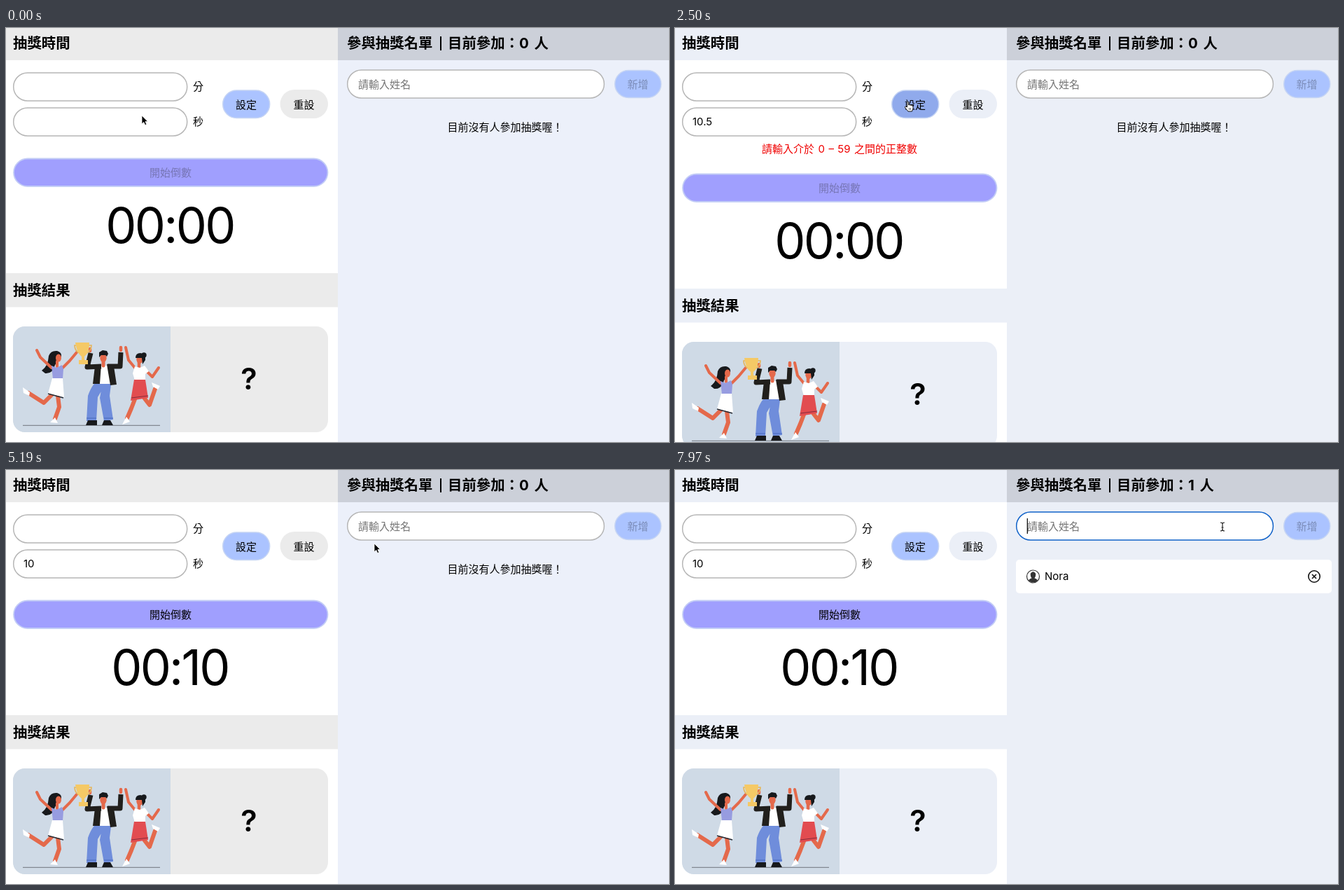
An HTML page for the animation above (8 s loop, 947 px wide and 591 px high).

```html
<!DOCTYPE html>
<html lang="zh-Hant">
<head>
<meta charset="utf-8">
<title>抽獎</title>
<style>
html, body { margin: 0; width: 100%; height: 100%; overflow: hidden; background: #fff; }
svg { display: block; width: 947px; height: 591px; }
text { font: 15px Inter, "Noto Sans CJK TC", "Noto Sans CJK", sans-serif; white-space: pre; }
.head { font-size: 20.4px; font-weight: 700; word-spacing: 3px; }
.mid { text-anchor: middle; }
#error { word-spacing: 1.2px; }
.clock { font-size: 70px; letter-spacing: -2.7px; font-feature-settings: "calt" 0; }
.mark { font-size: 43px; font-weight: 600; }
.box { fill: #fff; stroke: #b6b6b6; stroke-width: 1.5; }
.btn { fill: #abc3ff; stroke: #c6d5f4; stroke-width: 1.5; }
.limb { fill: none; stroke: #e4694b; stroke-linecap: round; stroke-linejoin: round; }
</style>
</head>
<body>
<svg viewBox="0 0 947 591">
  <defs>
    <clipPath id="card"><rect x="10" y="426" width="450" height="151" rx="17"/></clipPath>
  </defs>

  <rect class="panel" width="474" height="46"/>
  <text class="head" x="10" y="29">抽獎時間</text>
  <rect class="box" x="10.7" y="64" width="248" height="40" rx="20"/>
  <rect class="box" id="secBox" x="10.7" y="114" width="248" height="40" rx="20"/>
  <text x="267" y="89">分</text>
  <text x="267" y="139">秒</text>
  <text id="sec" x="25" y="139"></text>
  <g id="spin">
    <rect x="232" y="123" width="12" height="22" rx="1" fill="#eeeef1"/>
    <path d="M235 131l3-4 3 4zM235 137l3 4 3-4z" fill="#444"/>
  </g>
  <rect id="secCaret" y="123" width="1.2" height="21"/>
  <rect class="btn" id="set" x="309.7" y="89" width="67" height="39.5" rx="19.7"/>
  <text class="mid" x="343" y="114.5">設定</text>
  <rect class="panel" x="391.5" y="88" width="68.5" height="41" rx="20.5"/>
  <text class="mid" x="425.5" y="114.5">重設</text>
  <text class="mid" id="error" x="235" y="178" fill="#f00000">請輸入介於 0 – 59 之間的正整數</text>

  <g id="lower">
    <rect id="start" x="11" y="186.5" width="448.5" height="39.5" rx="19.7" stroke="#c3cdf6" stroke-width="1.8"/>
    <text class="mid" id="startText" x="235" y="211.5">開始倒數</text>
    <text class="mid clock" id="clock" x="234" y="306.5"></text>
    <rect class="panel" y="350" width="474.5" height="48.5"/>
    <text class="head" x="10" y="381.5">抽獎結果</text>
    <g clip-path="url(#card)">
      <rect class="panel" x="10" y="426" width="450" height="151"/>
      <rect x="10" y="426" width="225" height="151" fill="#cfdae6"/>
      <path d="M24 567.3H220" stroke="#70757c"/>

      <g id="leftWoman">
        <path d="M61 468q3-8 12-7 7 2 6 8l-9 12q-3 13-14 12l-5-4q9-6 10-21z" fill="#17191c"/>
        <path class="limb" d="M65 485L49 470 44 460M80 486L91 475 101 463" stroke-width="4"/>
        <path class="limb" d="M66 523L54 535 32 521" stroke-width="6"/>
        <path class="limb" d="M74 525L76 541 70 558" stroke-width="6"/>
        <path class="limb" d="M73 476V483" stroke-width="4"/>
        <ellipse cx="75" cy="471" rx="4" ry="5.5" fill="#e4694b"/>
        <path d="M65 482L72 485 80 481 82 487 81 501H67z" fill="#979ce0"/>
        <path d="M66 500H81L83 527 60 522z" fill="#fff"/>
        <path d="M60 522L82 528" stroke="#252932" stroke-width="1.5"/>
        <path d="M24 513L34 520 33 525 25 521zM70 556L74 564 63 563z" fill="#fff"/>
      </g>

      <g id="man">
        <path d="M133 501H144L143 507 131 527 129 561H115L117 525Q123 508 133 501zM139 501H151L148 525 153 559 140 561 134 528z" fill="#6f8ddb"/>
        <path d="M115 557H129M140 557H153" stroke="#496bbf" stroke-width="1.2"/>
        <path d="M117 560H130V567H114zM140 560H149L153 567H137z" fill="#17191c"/>
        <path d="M134 482H147L151 508H132z" fill="#fff"/>
        <path d="M136 483L116 484 121 464M145 483L163 483 164 463" fill="none" stroke="#211f1c" stroke-width="7" stroke-linejoin="round"/>
        <path d="M136 480L127 483 124 508H134zM144 480L154 483 158 509 149 510z" fill="#211f1c"/>
        <path class="limb" d="M120 461V458M164 460V456" stroke-width="4.5"/>
        <path class="limb" d="M139 475V482" stroke-width="5"/>
        <ellipse cx="139" cy="471" rx="4.7" ry="6" fill="#e4694b"/>
        <path d="M133 470V463L138 460 144 461 146 465 144 469 142 467H136z" fill="#17191c"/>
      </g>

      <g id="trophy">
        <path d="M101 453h-3q0 8 7 11M118 453h4q0 8-7 11" fill="none" stroke="#e6b65a" stroke-width="1.6"/>
        <path d="M99 449H119Q119 464 112 469V474H117V480H104V474H108V469Q101 464 99 449z" fill="#f5c966"/>
      </g>

      <g id="rightWoman">
        <circle cx="197" cy="467" r="3.7" fill="#17191c"/>
        <path class="limb" d="M184 485L175 474 171 456M200 489L209 498 218 485" stroke-width="4"/>
        <path class="limb" d="M198 529L205 538 213 515" stroke-width="6"/>
        <path class="limb" d="M184 530L179 543 173 557" stroke-width="6"/>
        <path class="limb" d="M190 476V484" stroke-width="4.5"/>
        <ellipse cx="191" cy="473" rx="4.7" ry="6" fill="#e4694b"/>
        <path d="M185 471q0-7 7-7 8 1 7 10l-4 6-1-9z" fill="#17191c"/>
        <path d="M184 483L191 485 198 482 204 490 199 494V503H184L181 493z" fill="#fff"/>
        <path d="M183 502H199L203 528 178 532z" fill="#e24c50"/>
        <path d="M179 528L203 525" stroke="#862c3b"/>
        <path d="M208 506L220 511 217 516 210 512zM172 555L177 562 166 566z" fill="#fff"/>
      </g>
      <text class="mid mark" x="347" y="515.5">?</text>
    </g>
  </g>

  <rect id="side" x="474" width="473" height="591"/>
  <rect x="474" width="473" height="46" fill="#ccd0d9"/>
  <text class="head" x="487" y="29">參與抽獎名單</text>
  <rect x="620" y="12" width="2" height="20"/>
  <text class="head" id="count" x="631" y="29"></text>
  <rect class="box" id="nameBox" x="487.7" y="60" width="366.7" height="40" rx="20"/>
  <text id="name" x="503" y="86"></text>
  <rect id="nameCaret" y="69" width="1.2" height="22"/>
  <rect class="btn" x="869.7" y="60.5" width="66" height="39" rx="19.5"/>
  <text class="mid" id="add" x="902.5" y="86">新增</text>
  <text class="mid" id="empty" x="713" y="147">目前沒有人參加抽獎喔！</text>
  <g id="row">
    <rect x="487" y="128" width="451" height="48" rx="5" fill="#fff"/>
    <circle cx="511.5" cy="152" r="9" fill="#fff" stroke="#333" stroke-width="1.2"/>
    <path d="M505 158Q506 155 509.5 154.5 507 151 508 147.5Q511.5 143 515 147.5 516 151 513.5 154.5 517 155 518 158 511.5 163 505 158z" fill="#333"/>
    <text x="528" y="157">Nora</text>
    <circle cx="913" cy="152" r="8.2" fill="none" stroke="#111" stroke-width="1.6"/>
    <path d="M910 149l6 6m0-6l-6 6" stroke="#111" stroke-width="1.7"/>
  </g>

  <g id="arrow" stroke="#fff" stroke-width=".8"><path d="M0 0V12L2.8 9.4 4.7 13.6 6.8 12.7 5 8.6H8.6z"/></g>
  <g id="beam" fill="none"><path d="M-3-6Q0-6 0-4V4Q0 6-3 6M3-6Q0-6 0-4V4Q0 6 3 6M-1.5 1H1.5" stroke="#222" stroke-width="1.2"/></g>
  <g id="hand" fill="#fff" stroke="#111" stroke-linejoin="round">
    <path d="M3.5 9V1.8Q4.5.2 5.6 1.8V6Q7 4.6 8 6.2 9.4 5.2 10 6.8 12 6 12 8.5V11L10.5 15H5L1 10.2Q-.2 8 1.5 7.8z"/>
    <path d="M6.5 10v3M8.5 10v3" stroke-width=".7"/>
  </g>
</svg>
<script>
const LOOP = 8000;
const $ = id => document.getElementById(id);
const panels = document.querySelectorAll('.panel');

// Each track is a list of [start time, value...] that holds until the next entry.
const tracks = {
  cursor: [
    [0, 'arrow', 194, 125], [100, 'beam', 203, 141], [500, 'beam', 206, 139], [600, 'beam', 209, 138],
    [2000, 'arrow', 262, 127], [2100, 'arrow', 298, 114], [2200, 'hand', 322, 106], [2300, 'hand', 328, 104],
    [2700, 'arrow', 300, 119], [2800, 'beam', 248, 133], [2900, 'beam', 215, 137], [3000, 'beam', 190, 138],
    [3790, 'beam', 232, 131], [3890, 'arrow', 301, 115], [3990, 'hand', 355, 102],
    [4490, 'arrow', 366, 163], [4590, 'hand', 364, 198],
    [4790, 'hand', 376, 195], [4890, 'hand', 398, 188], [4990, 'arrow', 432, 170], [5090, 'arrow', 476, 140],
    [5190, 'arrow', 526, 105], [5290, 'arrow', 570, 76], [5390, 'arrow', 598, 58],
    [5690, 'arrow', 609, 52], [5790, 'arrow', 613, 50], [5890, 'arrow', 628, 54],
    [6090, 'beam', 700, 78], [6380, 'beam', 768, 82], [6480, 'beam', 786, 82],
    [6680, 'beam', 795, 82], [6780, 'beam', 790, 82], [6980, 'beam', 782, 81]
  ],
  sec: [[0, ''], [1400, '10'], [1700, '10.'], [1900, '10.5'], [3590, '10.'], [3690, '10']],
  secFocus: [[0, 0], [900, 1], [2500, 0], [3300, 1], [4190, 0]],
  secCaret: [[0, 0], [900, 1], [1200, 0], [1400, 1], [2000, 0], [3300, 1], [3790, 0]],
  spin: [[0, 0], [500, 1], [2500, 0], [2800, 1], [4190, 0]],
  error: [[0, 0], [2500, 1], [4190, 0]],
  ready: [[0, 0], [4190, 1]],
  cool: [[0, 0], [2500, 1], [4790, 0], [5890, 1]],
  name: [[0, ''], [7180, 'N'], [7280, 'No'], [7380, 'Nor'], [7480, 'Nora'], [7670, '']],
  nameFocus: [[0, 0], [6380, 1]],
  nameCaret: [[0, 0], [6380, 1], [6880, 0], [7180, 1], [7670, 0], [7970, 1]],
  added: [[0, 0], [7670, 1]]
};
const entry = (track, t) => tracks[track].findLast(k => k[0] <= t);
const at = (track, t) => entry(track, t)[1];

const show = (id, on) => $(id).setAttribute('display', on ? 'inline' : 'none');
const paint = (id, color) => $(id).setAttribute('fill', color);
const write = (id, text) => { if ($(id).textContent !== text) $(id).textContent = text; };
const focus = (id, on) => { $(id).style.stroke = on ? '#1263c9' : ''; };

function caret(id, field, typed, on) {
  const width = typed ? $(field).getComputedTextLength() : 0;
  $(id).setAttribute('x', +$(field).getAttribute('x') + width - 0.3);
  show(id, on);
}

function draw(t) {
  const [, kind, x, y] = entry('cursor', t);
  const error = at('error', t), ready = at('ready', t), cool = at('cool', t);
  const typed = at('name', t), added = at('added', t);
  const over = (left, top, w, h) =>
    kind === 'hand' && x >= left && x < left + w && y >= top && y < top + h;

  for (const p of panels) p.setAttribute('fill', cool ? '#ebeff7' : '#ebebeb');
  paint('side', cool ? '#ebeff7' : '#ecf0fa');

  write('sec', at('sec', t));
  focus('secBox', at('secFocus', t));
  caret('secCaret', 'sec', at('sec', t), at('secCaret', t));
  show('spin', at('spin', t));
  $('set').style.fill = over(309, 88, 68, 41) ? '#90aaec' : '';

  show('error', error);
  $('lower').setAttribute('transform', `translate(0 ${error ? 22 : 0})`);
  paint('start', ready && over(11, 186, 449, 41) ? '#8086dc' : '#a09ffe');
  paint('startText', ready ? '#000' : '#7675b4');
  write('clock', ready ? '00:10' : '00:00');

  write('count', `目前參加：${added} 人`);
  write('name', typed || '請輸入姓名');
  paint('name', typed ? '#000' : '#757575');
  focus('nameBox', at('nameFocus', t));
  caret('nameCaret', 'name', typed, at('nameCaret', t));
  paint('add', typed ? '#000' : '#7b8cb7');
  show('empty', !added);
  show('row', added);

  for (const id of ['arrow', 'beam', 'hand']) show(id, id === kind);
  $(kind).setAttribute('transform', `translate(${x} ${y})`);
}

const begin = performance.now();
function tick() {
  draw((performance.now() - begin) % LOOP);
  requestAnimationFrame(tick);
}
tick();
</script>
</body>
</html>
```
